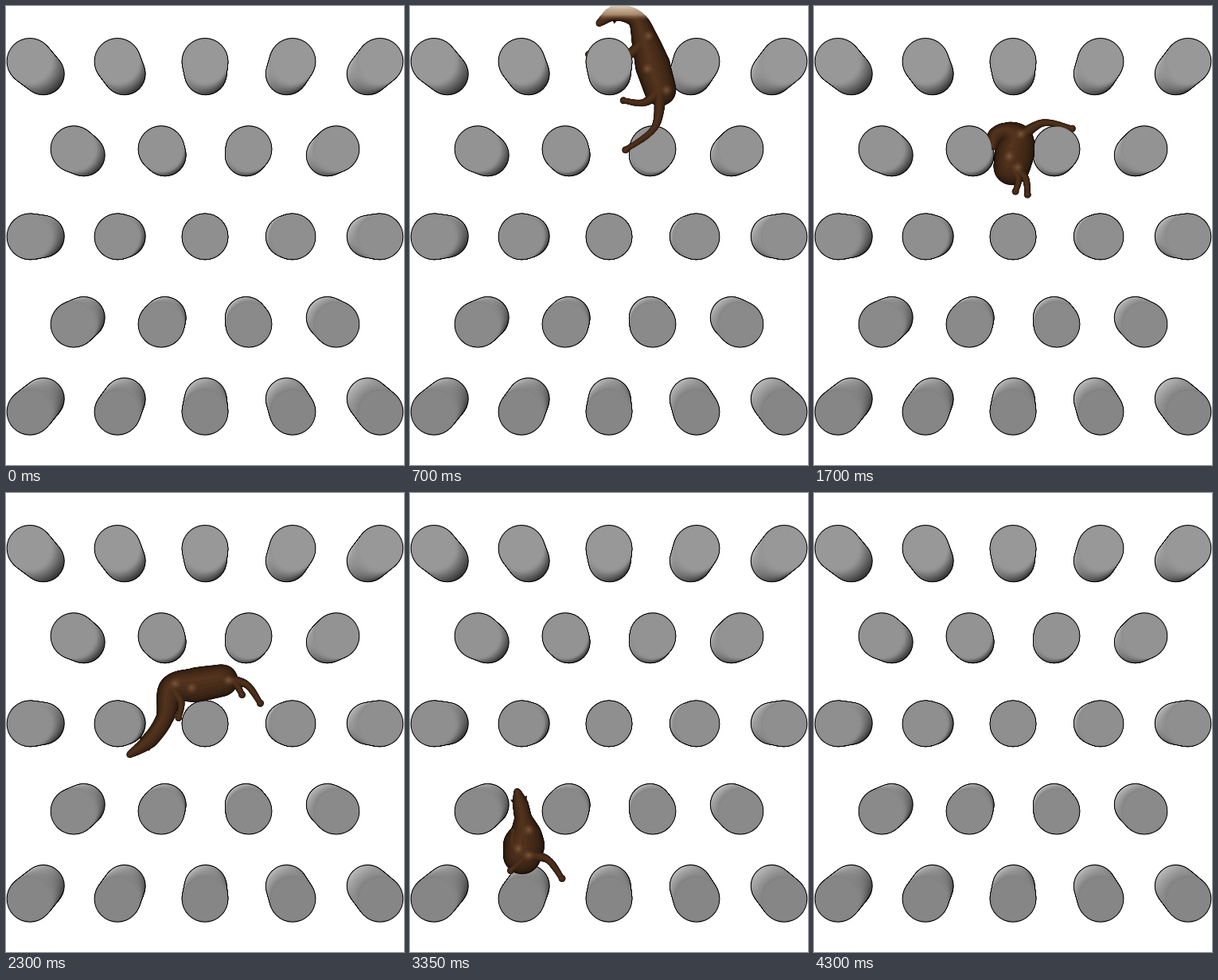
Write an HTML page with a canvas that moves like this. It is 500 by 577 pixels and loops after 4350 ms.

```html
<!DOCTYPE html>
<html lang="en">
<head>
<meta charset="utf-8">
<title>Tumbling through pegs</title>
<style>
  html, body { margin: 0; width: 100%; height: 100%; overflow: hidden; background: #fff; }
  canvas { display: block; }
</style>
</head>
<body>
<canvas id="stage" width="500" height="577"></canvas>
<script>
const W = 500, H = 577, LOOP = 4350, STEP = 50, TAU = Math.PI * 2;
const stage = document.getElementById('stage').getContext('2d');
const layer = () => {
  const c = document.createElement('canvas');
  c.width = W; c.height = H;
  return c.getContext('2d');
};
const mix = (a, b, u) => a + (b - a) * u;
const grey = v => `rgb(${v},${v},${v})`;
const disc = (g, x, y, r, fill) => {
  g.fillStyle = fill;
  g.beginPath();
  g.arc(x, y, Math.max(r, 0.1), 0, TAU);
  g.fill();
};
const step = ([x, y], degrees, length) => {
  const a = degrees * Math.PI / 180;
  return [x + Math.cos(a) * length, y + Math.sin(a) * length];
};

// Pegs: the far end shrinks towards the vanishing point.
const sides = layer(), tops = layer();

function drawPeg(x, y) {
  const dx = (260 - x) * 0.074, dy = (287 - y) * 0.074, n = 36;
  const face = mix(152, 134, (y - 69) / 441);
  const slice = (u, grow, fill) => disc(sides, x + dx * u, y + dy * u, mix(28.7, 26, u) + grow, fill);
  for (let i = n; i >= 0; i--) slice(i / n, 0.7, '#000');
  for (let i = n; i >= 0; i--) {
    const u = i / n;
    const fill = sides.createConicGradient(0, x + dx * u, y + dy * u);
    for (let s = 0; s <= 24; s++) {
      const lit = 118 + 68 * Math.cos(s / 24 * TAU + 2.3);
      fill.addColorStop(s / 24, grey(mix(face - 2, lit, u ** 1.1)));
    }
    slice(u, -0.4, fill);
  }
  disc(tops, x, y, 28.2, grey(face - 4));
  disc(tops, x, y, 27, grey(face));
}

for (let row = 0; row < 5; row++) {
  const odd = row % 2;
  for (let i = 0; i < 5 - odd; i++) drawPeg(30 + odd * 55 + i * 110, 69.5 + row * 110.2);
}

// Angles in degrees. turn: heading of the trunk; nod and curl: neck against it;
// trunk and neck: foreshortening. Legs: angle against the trunk, reach.
const POSES = [
  { t: 700, x: 305, y: 75, turn: -107, trunk: 1, nod: -5, curl: -50, neck: 0.8,
    near: [-133, 87], far: [-89, 48], fore: [-86, 73] },
  { t: 1700, x: 252, y: 185, turn: -78, trunk: 0.56, nod: -66, curl: -57, neck: 0.45,
    near: [-222, 40], far: [-201, 31], fore: [67, 70] },
  { t: 2300, x: 240, y: 241, turn: -190, trunk: 1, nod: -66, curl: 20, neck: 1,
    near: [-139, 56], far: [-134, 31], fore: [-93, 37] },
  { t: 2700, x: 195, y: 300, turn: -264, trunk: 1, nod: 41, curl: 10, neck: 0.35,
    near: [-116, 29], far: [-179, 42], fore: [29, 73] },
  { t: 3350, x: 143, y: 443, turn: -440, trunk: 0.4, nod: -18, curl: -3, neck: 0.55,
    near: [-250, 58], far: [-30, 32], fore: [193, 48] }
];

function blend(a, b, u) {
  if (typeof a === 'number') return mix(a, b, u);
  const out = Array.isArray(a) ? [] : {};
  for (const k in a) out[k] = blend(a[k], b[k], u);
  return out;
}

// Fall in, bounce from pose to pose, then slip off to the right and fall out.
function poseAt(t) {
  const first = POSES[0], last = POSES[POSES.length - 1];
  if (t <= first.t) {
    const s = (first.t - t) / 1000;
    return { ...first, y: first.y - 650 * s, turn: first.turn - 100 * s };
  }
  if (t >= last.t) {
    const s = (t - last.t) / 1000;
    return { ...last, x: last.x + 70 * s, y: last.y + 40 * s + 300 * s * s, turn: last.turn + 115 * s };
  }
  const i = POSES.findIndex(p => p.t > t);
  const a = POSES[i - 1], b = POSES[i], u = (t - a.t) / (b.t - a.t);
  const pose = blend(a, b, u);
  pose.y -= 24 * u * (1 - u);
  return pose;
}

function skeleton(p) {
  const mid = [p.x, p.y], span = 32 * p.trunk;
  const spine = [step(mid, p.turn + 180, span), mid, step(mid, p.turn, span)];
  for (let i = 0; i < 3; i++) {
    spine.push(step(spine[i + 2], p.turn + p.nod + p.curl * i, (37 - 3 * i) * p.neck));
  }
  const limb = (hip, [angle, reach]) => {
    const foot = step(hip, p.turn + angle, reach);
    const knee = step(step(hip, p.turn + angle, reach / 2), p.turn + angle - 90, reach * 0.2);
    return [hip, knee, foot];
  };
  return {
    spine,
    girth: 1 + 0.3 * (1 - p.trunk),
    near: limb(spine[0], p.near),
    far: limb(spine[0], p.far),
    fore: limb(spine[2], p.fore)
  };
}

const spline = (a, b, c, d, u) => b + 0.5 * u * (c - a + u * (2 * a - 5 * b + 4 * c - d + u * (3 * (b - c) + d - a)));

function tube(pts, radii) {
  const dots = [], end = pts.length - 1;
  for (let i = 0; i < end; i++) {
    const four = [pts[Math.max(i - 1, 0)], pts[i], pts[i + 1], pts[Math.min(i + 2, end)]];
    for (let s = 0; s <= 18; s++) {
      const u = s / 18;
      dots.push([0, 1].map(k => spline(...four.map(p => p[k]), u)).concat(mix(radii[i], radii[i + 1], u)));
    }
  }
  return dots;
}

const leg = pts => tube(pts, [9, 4.5, 3.2]).concat([[...pts[2], 4.4]]);

// All parts share each shade, so that they melt into one hide.
function hide(g, dots) {
  const n = 7;
  for (let i = 0; i <= n; i++) {
    const u = i / n, size = 1 - 0.9 * u ** 1.6, lift = 1 - size;
    const tone = Math.sqrt(u);
    const fill = `rgb(${mix(18, 84, tone)},${mix(10, 53, tone)},${mix(5, 31, tone)})`;
    for (const [x, y, r] of dots) disc(g, x - r * lift * 0.2, y - r * lift * 0.3, r * size, fill);
  }
}

function ears(g, head, nose) {
  const aim = Math.atan2(nose[1] - head[1], nose[0] - head[0]) * 180 / Math.PI;
  g.fillStyle = '#28170b';
  for (const side of [-1, 1]) {
    g.beginPath();
    for (const [angle, length] of [[110, 7], [50, 14], [15, 9]]) g.lineTo(...step(head, aim + side * angle, length));
    g.fill();
  }
}

function shine(g, [x, y], r) {
  const glow = g.createRadialGradient(x, y, 0, x, y, r);
  glow.addColorStop(0, 'rgba(150,112,80,.6)');
  glow.addColorStop(1, 'rgba(110,72,42,0)');
  disc(g, x, y, r, glow);
}

const animal = layer(), front = layer();

function drawAnimal({ spine, girth, near, far, fore }) {
  const g = animal;
  g.globalCompositeOperation = 'source-over';
  g.clearRect(0, 0, W, H);
  ears(g, spine[4], spine[5]);
  const radii = [20, 22, 17, 11, 10, 4].map((r, i) => i < 3 ? r * girth : r);
  hide(g, [...tube(spine, radii), ...leg(far), ...leg(fore), ...leg(near)]);

  g.globalCompositeOperation = 'source-atop';
  for (let i = 0; i < 3; i++) shine(g, step(spine[i], i * 150, 8), 8);
  const haze = g.createLinearGradient(0, 0, 0, 18);
  haze.addColorStop(0, 'rgba(238,220,198,.9)');
  haze.addColorStop(0.6, 'rgba(205,175,145,.7)');
  haze.addColorStop(1, 'rgba(120,80,50,0)');
  g.fillStyle = haze;
  g.fillRect(0, 0, W, 18);

  // The near leg passes over the peg faces.
  front.globalCompositeOperation = 'source-over';
  front.clearRect(0, 0, W, H);
  for (const [x, y, r] of leg(near)) disc(front, x, y, r, '#000');
  front.globalCompositeOperation = 'source-in';
  front.drawImage(g.canvas, 0, 0);
}

function draw(t) {
  drawAnimal(skeleton(poseAt(t)));
  stage.fillStyle = '#fff';
  stage.fillRect(0, 0, W, H);
  for (const g of [sides, animal, tops, front]) stage.drawImage(g.canvas, 0, 0);
}

const start = performance.now();
let shown = -1;
function tick() {
  const t = Math.floor((performance.now() - start) % LOOP / STEP) * STEP;
  if (t !== shown) draw(shown = t);
  requestAnimationFrame(tick);
}
tick();
</script>
</body>
</html>
```
